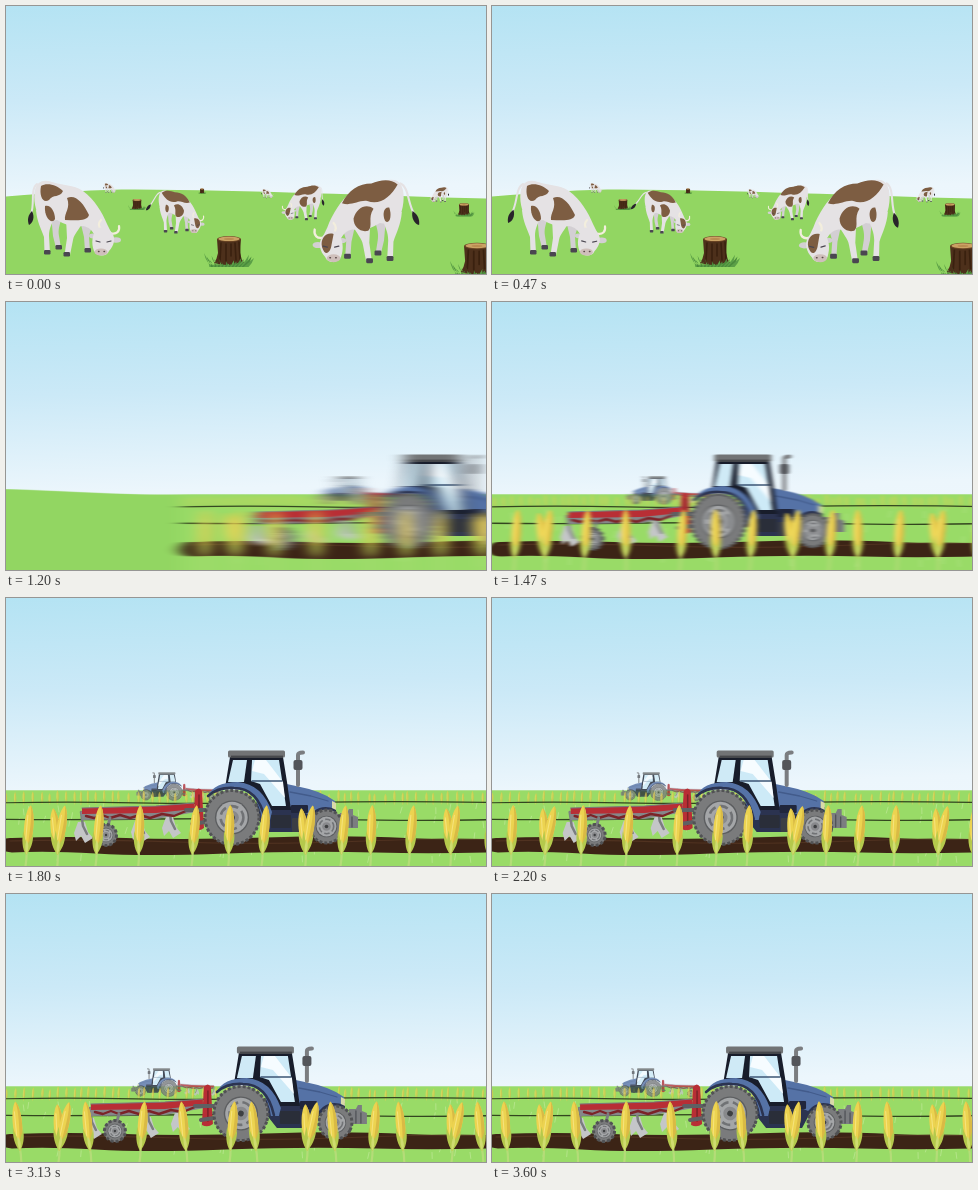
Write an HTML page that moves like this. It is 480 px wide and 268 px high and loops after 3.67 s.

```html
<!DOCTYPE html>
<html lang="en">
<head>
<meta charset="utf-8">
<title>Pasture to field</title>
<style>
html, body { margin: 0; width: 100%; height: 100%; overflow: hidden; background: #dff1fb; }
svg { display: block; width: 100vw; height: 100vh; }
</style>
</head>
<body>
<svg id="stage" viewBox="0 0 480 268" preserveAspectRatio="none"></svg>
<script>
const LOOP = 3670, PAN_START = 716, PAN_TIME = 880, PAN = 720;
const stage = document.getElementById('stage');

let seed = 7;
const rnd = () => (seed = (seed * 16807) % 2147483647) / 2147483647;
const range = (n, f) => Array.from({ length: n }, (_, i) => f(i)).join('');
const path = (d, fill) => `<path d="${d}" fill="${fill}"/>`;
const line = (d, stroke, w = 1) =>
  `<path d="${d}" fill="none" stroke="${stroke}" stroke-width="${w}" stroke-linecap="round" stroke-linejoin="round"/>`;
const rect = (x, y, w, h, fill, r = 0) =>
  `<rect x="${x}" y="${y}" width="${w}" height="${h}" rx="${r}" fill="${fill}"/>`;
const oval = (x, y, rx, ry, fill) => `<ellipse cx="${x}" cy="${y}" rx="${rx}" ry="${ry}" fill="${fill}"/>`;
const place = (x, y, sx, sy, body) => `<g transform="translate(${x} ${y}) scale(${sx} ${sy})">${body}</g>`;

// Pasture
const HIDE = '#e5e2e4', SHADE = '#d3cfd3', BROWN = '#7d5d42', DARK = '#4a4650';
const patches = [
  ['M8 6C14 2 24 5 30 11C27 18 20 14 16 20C10 24 6 16 8 6Z',
   'M34 18C42 14 50 22 56 35C54 42 42 40 32 40C31 33 38 28 34 18Z',
   'M12 26C17 24 22 31 22 39C19 45 11 38 12 26Z'],
  ['M7 5C14 -1 24 1 32 4C44 4 54 10 60 22C51 25 44 19 36 20C24 24 14 17 7 5Z',
   'M30 27C37 22 46 26 49 36C49 44 42 49 35 47C30 42 36 36 30 27Z',
   'M15 26C20 25 22 32 19 38C15 42 12 34 15 26Z']
];

// rest: tail angle at the start, swing: share of the common wag
function cow(x, y, sx, sy, kind, rest = 0, swing = 0) {
  const hoof = (hx, hy) => rect(hx, hy, 6.5, 4.5, DARK, 1.2);
  return place(x, y, sx, sy,
    `<g class="tail" data-rest="${rest}" data-swing="${swing}">${line('M4 4C-3 9 2 24 -2 34', HIDE, 2)}` +
    path('M-1 31C2 37 0 43 -4 45C-6 40 -5 35 -1 31Z', '#28242a') + '</g>' +
    path('M18 34H30C26 46 25 50 26 56L28 68H23L20 56Z', SHADE) + hoof(22.5, 65) +
    path('M46 36H63C60 46 57 50 56 57L57 71H52L51 57Z', SHADE) + hoof(51.5, 68) +
    path('M2 10C4 1 11 -1 19 2C30 6 40 4 50 11C62 20 69 32 74 44L80 56C76 66 66 64 62 56C59 50 56 47 50 46C40 47 32 45 24 40L9 42C2 32 0 18 2 10Z', HIDE) +
    path('M3 30L23 33C19 44 16 48 16 56L17 73H11.5L11 57C8 48 4 42 3 30Z', HIDE) + hoof(11, 70) +
    path('M33 38L51 40C46 50 41 54 40 60L37 75H31.5L34 58Z', HIDE) + hoof(30.5, 72) +
    patches[kind].map(d => path(d, BROWN)).join('') +
    '<g class="head">' +
    line('M69 50C65 47 65 43 68 40M77 53C84 55 87 51 86 46', '#f3eedd', 2.2) +
    oval(83, 60, 5, 2.8, SHADE) + oval(60, 56, 4, 2.4, SHADE) +
    path('M64 49C59 55 58 63 61 71C64 77 74 77 76 71C81 66 83 58 79 53C76 48 68 46 64 49Z', HIDE) +
    (kind ? path('M68 50C75 48 81 54 79 62C76 71 71 67 70 60Z', BROWN) : '') +
    oval(68, 72, 6.5, 3.6, '#cfbfbb') + line('M63 61L67 62M74 62L78 61', DARK, 1.2) +
    line('M65.5 71.5h.5M71 71.5h.5', '#5c4a4a', 1.4) + '</g>');
}

const stump = (x, y, s) => place(x, y, s, s,
  path('M-12 0L-11 14Q-12 20 -15 24Q0 29 15 24Q12 20 11 14L12 0Z', '#4d301b') +
  line('M-8 4L-9 21M-3 5V22M2 5V17M6 4L7 21M10 3L11 20', '#3a210f', 1.6) +
  oval(0, 0, 12, 3, '#6b4524') + oval(0, -.2, 10.6, 2.3, '#cba265') + oval(0, 0, 5, 1, '#b98c50') +
  range(21, i => {
    const k = i - 10, tip = 23 - Math.abs(k) * .9 + (i % 3) * 2.5;
    return path(`M${k * 1.7 - 2.6} 28Q${k * 2} 23 ${k * 2.5} ${tip}Q${k * 2.3} 25 ${k * 1.7 + 2.6} 28Z`,
      i % 2 ? '#4a8a3c' : '#5b9f47');
  }));

const pasture =
  cow(98, 177, .14, .13, 0) + cow(256, 183, .13, .12, 0) + cow(442, 181, -.21, .2, 1) +
  stump(196, 183, .17) + stump(131, 194, .36) + stump(458, 198.5, .42) +
  cow(152, 184, .53, .57, 1, 30, .4) + cow(316, 179, -.46, .46, 1, 0, -.4) +
  cow(27, 174, 1, 1, 0, 0, 1) + cow(399, 173, -1.05, 1.1, 1, 14, -1) +
  stump(223, 233, 1) + stump(471, 240, 1.08);

// Field
const BLUE = '#5572a6', NAVY = '#2b3350', GREY = '#7b7d80', RED = '#b82e35', WINE = '#7b2328';

const wheel = (x, y, r) => `<g transform="translate(${x} ${y})"><g class="wheel" data-r="${r}">
  <circle r="${r - 1}" fill="#7a7b7c"/>
  <circle r="${r - 1.5}" fill="none" stroke="#515254" stroke-width="3" stroke-dasharray="3 2"/>
  <circle r="${r * .6}" fill="#5c5e60"/><circle r="${r * .55}" fill="#a4a6a8"/>
  <circle r="${r * .4}" fill="none" stroke="#707275" stroke-width="${r * .09}" stroke-dasharray="${r * .3} ${r * .15}"/>
  <circle r="${r * .24}" fill="#88898c"/><circle r="${r * .1}" fill="#3e4042"/></g></g>`;

const share = (x, y) => path(`M${x} ${y}l7 0l3 10l5 6l-8 5l-4 -7l-5 5l-2 -8z`, '#c4c6c8') +
  line(`M${x + 3} ${y - 10}l2 14l4 8`, GREY, 2.5);

const tractor =
  // plough
  share(72, 224) + share(129, 223) + share(160, 219) +
  path('M75 214L132 212L190 208V214L150 221L76 222Z', '#85878a') +
  path('M76 210L150 208L188 205V211L150 215L76 216Z', RED) +
  line('M80 218L88 220L96 217L104 220L114 217L124 220L134 217L144 220L156 216L168 218L180 213', WINE, 2.4) +
  line('M76 210L150 208L188 205', '#77797c', 1.2) +
  line('M104 220L100 236', GREY, 3) + wheel(100, 237, 12) +
  path('M189 193Q193 188 196 193L198 230Q193 234 187 231Z', RED) + line('M193 197V227', WINE, 1.5) +
  line('M180 212H210M186 226L212 222', '#5e6063', 4) +
  // chassis and bonnet
  path('M240 206L286 205L330 209V216L306 219L298 234H262Z', NAVY) +
  path('M276 185L290 188Q316 193 329 203V211Q317 206 308 213L304 217L281 207Z', BLUE) +
  line('M284 194L305 198L322 203', '#425b8b', 1.3) + rect(285, 207, 17, 8, '#20263c', 1) +
  path('M326 203l4 2v7l-4 -2z', '#d9d9a8') +
  // exhaust
  line('M292 187V157Q292 154.5 297 154.5', GREY, 4) + rect(287.5, 162, 9, 10, '#53555a', 2) +
  // cab
  path('M224 159H277L281 184L285 212H262L246 190H219Z', '#181d2b') +
  path('M227 162H241L238 184H222Z', '#cfeaf6') +
  path('M246 162H273L280 208H266L254 186L245 183Z', '#cdeaf7') +
  path('M249 162H260L277 184L279 200L258 176L246 173Z', '#f6fcff') +
  line('M246 183L276 183', '#3d5675', 1.3) + line('M244 161L241 186', '#181d2b', 3.4) +
  rect(222, 152.5, 57, 7, '#717375', 1.5) + rect(225, 157.6, 52, 2.2, '#46484b') +
  // wing and wheels
  path('M202 198Q208 184 232 184Q256 186 266 214L264 222L256 222Q252 190 226 191Q211 191 202 198Z', BLUE) +
  line('M202 198Q212 189 228 190Q252 190 259 221', NAVY, 2.6) +
  rect(265, 217, 20, 13, '#2a2e39', 1) + rect(286, 220, 7, 14, '#3b3e44', 1) +
  path('M334 215h7l2 -4h4v6l5 2v11h-14l-4 -4z', GREY) + line('M341 217v12M346 219v10', '#515358', 1.3) +
  wheel(226, 219.5, 28.5) + wheel(320.5, 228.5, 18);

const cob = (x, h, w) =>
  path(`M${x} 2C${x - w * 1.2} ${-h * .25} ${x - w * 1.1} ${-h * .85} ${x} ${-h}C${x + w * 1.1} ${-h * .85} ${x + w * 1.2} ${-h * .25} ${x} 2Z`, '#ecd350') +
  path(`M${x} 2C${x + w * .3} ${-h * .4} ${x + w * .5} ${-h * .8} ${x} ${-h}C${x + w * 1.1} ${-h * .85} ${x + w * 1.2} ${-h * .25} ${x} 2Z`, '#d9ba45') +
  line(`M${x - w * .35} ${-h * .25}V${-h * .78}`, '#f5e37c', w * .2);

const husk = path('M0 4C-5 -2 -6 -12 -5 -20C-3 -13 -1 -8 0 -5C1 -9 4 -13 5 -18C6 -9 4 -2 0 4Z', '#b5c94c') +
  path('M0 4C-2 -1 -2 -7 -1 -11C2 -7 2 -1 0 4Z', '#cfdc70');

function corn(x, kind, pair) {
  const tilt = (a, h) => `<g transform="rotate(${a})">${cob(0, h, 5.4)}${husk}</g>`;
  return `<g class="corn" data-x="${x}" data-kind="${kind}">` +
    line('M0 0Q1 10 -1 22', '#b4dc78', 2.2) +
    (pair ? tilt(-7, 43) + tilt(8, 46) : tilt(1, 46)) + '</g>';
}

const farCorn = range(62, i => place(i * 8 + rnd() * 5, 205 + rnd() * 1.5, .26, .24 + rnd() * .07,
  cob(0, 44, 5) + husk));

const blades = range(70, () => {
  const x = rnd() * 490, y = 209 + rnd() * 58;
  return line(`M${x.toFixed(1)} ${y.toFixed(1)}l${(rnd() * 3 - 1).toFixed(1)} -6`, '#b4e589', 1);
});

const field =
  rect(-6, 192.6, 900, 76, '#99db67') + blades +
  `<g id="far" opacity=".78">${place(236, 128.5, -.3, .3, tractor)}</g><g id="row" opacity=".65">${farCorn}</g>` +
  line('M-4 204.8Q60 203.6 130 204.8T300 204.4T500 204.8', '#33461f', 1.2) +
  line('M-4 221.3Q70 222 150 221T330 221.6T500 221.3', '#33461f', 1.4) +
  path('M-6 248Q-4 239 6 240Q60 238 120 240T260 239.5T400 240T520 239V253Q440 256.5 370 254.5T220 255.5T90 255.5T6 254.5Q-5 254 -6 248Z', '#3c2416') +
  line('M4 243Q80 241 170 244T360 243T500 243', '#503220', 1.2) +
  `<g id="near">${tractor}</g>` +
  [22, 92, 188, 258, 337, 405, 484].map(x => corn(x, 0, false)).join('') +
  [133, 223, 365].map(x => corn(x, 1, false)).join('') +
  [52, 300, 445].map(x => corn(x, 1, true)).join('');

stage.innerHTML = `<defs>
  <linearGradient id="sky" x2=".06" y2="1"><stop stop-color="#b4e3f3"/><stop offset=".35" stop-color="#cbe9f7"/>
    <stop offset=".72" stop-color="#ecf6fc"/><stop offset="1" stop-color="#f0f8fd"/></linearGradient>
  <filter id="smear" filterUnits="userSpaceOnUse" x="-50" y="0" width="580" height="268" color-interpolation-filters="sRGB">
    <feGaussianBlur id="blur" stdDeviation="0 0"/></filter></defs>
  <rect width="480" height="268" fill="url(#sky)"/>
  <g id="lens"><g id="world">` +
  path('M-80 197L0 190.6C50 186 90 183.4 130 183.4C240 184 370 189.5 480 192.6C500 190 515 187 540 187C600 189 640 192 690 192.6H1400V268H-80Z', '#92d662') +
  pasture + `<g transform="translate(${PAN} 0)">${field}</g></g></g>`;

// Motion
const all = sel => [...stage.querySelectorAll(sel)];
const [lens, world, blur, far, near, row] =
  ['lens', 'world', 'blur', 'far', 'near', 'row'].map(id => document.getElementById(id));
const tails = all('.tail'), heads = all('.head'), wheels = all('.wheel'), stalks = all('.corn');
const move = (el, v) => el.setAttribute('transform', v);

const expoInOut = p => p <= 0 ? 0 : p >= 1 ? 1 :
  p < .5 ? 2 ** (20 * p - 10) / 2 : 1 - 2 ** (10 - 20 * p) / 2;

function draw(ms) {
  const t = ms / 1000, p = (ms - PAN_START) / PAN_TIME;
  move(world, `translate(${-PAN * expoInOut(p)} 0)`);
  if (p > 0 && p < 1) {
    blur.setAttribute('stdDeviation', `${8 * (1 - Math.abs(2 * p - 1))} 0`);
    lens.setAttribute('filter', 'url(#smear)');
  } else lens.removeAttribute('filter');

  const wag = 9 * (1 - Math.cos(2 * Math.PI * t / 1.74));
  tails.forEach(el => move(el, `rotate(${+el.dataset.rest + wag * el.dataset.swing} 4 5)`));
  const nod = 2 * Math.sin(2 * Math.PI * t / 1.2);
  heads.forEach(el => move(el, `rotate(${nod} 68 46)`));

  const drive = 6.7 * (t - 1.8);
  move(near, `translate(${drive} 0)`);
  move(far, `translate(${-4 * (t - 1.8)} 0)`);
  wheels.forEach(el => move(el, `rotate(${drive / el.dataset.r * 180 / Math.PI})`));

  const sway = [
    -6 + 6 * Math.cos(2 * Math.PI * (t - 1.75) / 2.9),
    4.5 * Math.sin(Math.PI * (t - 1.8) / 1.8)
  ];
  stalks.forEach(el => {
    const { x, kind } = el.dataset, rest = kind === '0' ? 4 : 1;
    move(el, `translate(${x - rest} 253) rotate(${rest + sway[kind] * .88} 0 38)`);
  });
  move(row, `translate(0 205) skewX(${-sway[1]}) translate(0 -205)`);
}

let start;
function tick(now) {
  start ??= now;
  draw((now - start) % LOOP);
  requestAnimationFrame(tick);
}
draw(0);
requestAnimationFrame(tick);
</script>
</body>
</html>
```
